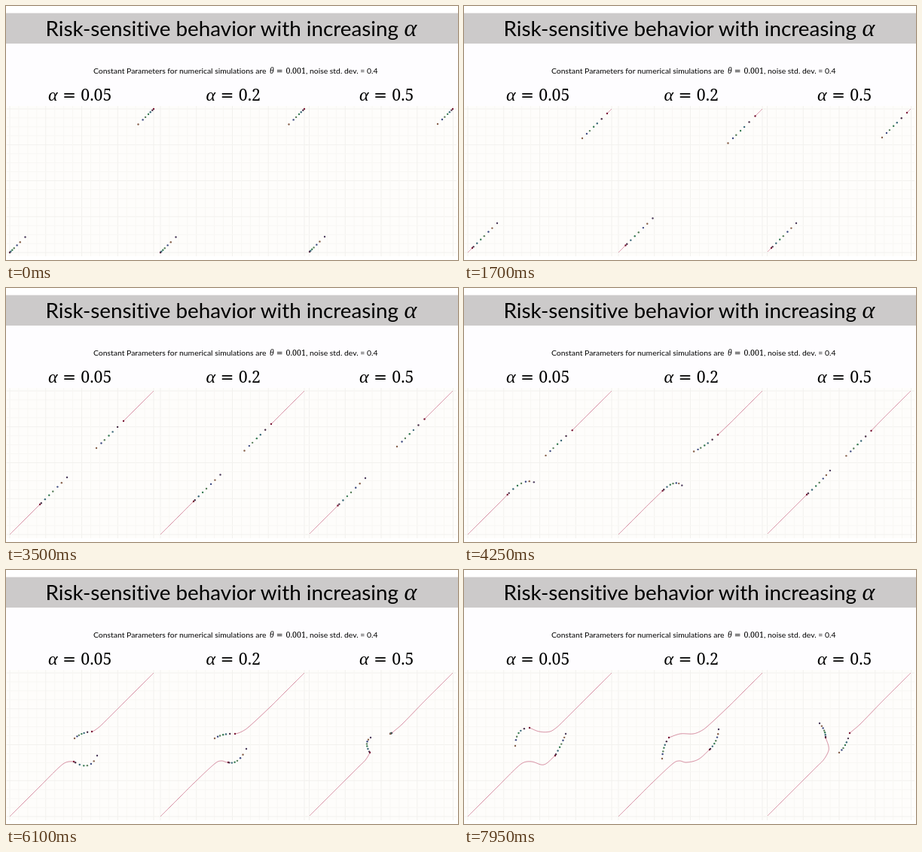
An HTML page for the animation above (8 s loop, 600 by 338 pixels).

```html
<!DOCTYPE html>
<html lang="en">
<head>
<meta charset="utf-8">
<title>Risk-sensitive behavior</title>
<style>
  html, body { margin: 0; width: 100%; height: 100%; overflow: hidden; background: #fff; }
  svg { display: block; width: 100vw; height: 100vh; }
  text { font-family: Lato, sans-serif; font-variant-ligatures: none; fill: #000; }
  .num { font-family: "Noto Serif", serif; }
  .sign { font-family: "DejaVu Serif", serif; }
  .var { font-family: "Liberation Serif", serif; font-style: italic; }
  .trail { fill: none; stroke: #c4607c; stroke-width: .75; }
</style>
</head>
<body>
<svg id="stage" viewBox="0 0 600 338">
  <rect y="50" width="600" height="83" fill="#fefdff"/>
  <rect y="9.5" width="600" height="40.5" fill="#cccaca"/>
  <rect y="133" width="600" height="200" fill="#fefdfb"/>
</svg>
<script>
const LOOP = 8000, STEP = 50, START = 700;
const stage = document.getElementById("stage");

function add(tag, attrs, content = "") {
  const el = document.createElementNS("http://www.w3.org/2000/svg", tag);
  for (const k in attrs) el.setAttribute(k, attrs[k]);
  el.textContent = content;
  stage.append(el);
  return el;
}
const label = (content, x, y, size, cls = "") => add("text", { x, y, "font-size": size, class: cls }, content);

// Text
label("Risk-sensitive behavior with increasing", 52.5, 40, 27.8);
label("α", 528.5, 40, 32, "var");
label("Constant Parameters for numerical simulations are", 116, 90, 10.42);
label("θ", 350, 90, 11.5, "var");
label("=", 358.8, 90, 10.5, "sign");
label("0.001", 371.5, 90, 10.6, "num");
label(", noise std. dev. = 0.4", 398, 90, 10.4);
for (const [x, value] of [[56, "0.05"], [265.5, "0.2"], [469, "0.5"]]) {
  label("α", x, 126, 24, "var");
  label("=", x + 19, 126, 21.5, "sign");
  label(value, x + 43.3, 126, 21.3, "num");
}

// Grid of the three plots
const UNIT = 11.94;
for (const cx of [100.5, 300.5, 498]) {
  for (let i = -8; i <= 8; i++) {
    const stroke = i % 4 ? "#f8f7f4" : "#f2f1ee", p = i * UNIT;
    add("path", { d: `M${cx + p} 133V333M${cx - 100} ${232.5 + p}h200`, stroke, "stroke-width": 1 });
  }
}

// Straight approach: distance of head and plan end from the start, per plot
const runs = [
  { head: [0, 6, 20, 40], end: [20.5, 39, 56, 76] },
  { head: [0, 9.5, 26, 44], end: [20.5, 45.5, 62.5, 79.5] },
  { head: [0, 5, 18, 37.5], end: [20, 38, 56, 74] }
];
// Avoidance: head points, then bend and end of the planned curve
const agents = [
  { run: 0, from: [5, 328], dir: 1,
    head: [[70, 263], [79.5, 256], [90, 255], [106, 259], [121, 247]],
    bend: [[93, 242], [111.5, 269], [131, 229.5]], end: [[104, 265], [121, 247], [135, 218]] },
  { run: 0, from: [196, 137], dir: -1,
    head: [[132, 201], [123, 209.5], [114, 215], [100, 215], [87, 210]],
    bend: [[113, 215.5], [100, 216], [69, 210]], end: [[99, 229], [91, 224], [68, 234]] },
  { run: 1, from: [205, 328], dir: 1,
    head: [[278, 257], [286, 254], [295, 256], [311, 252], [326, 239]],
    bend: [[292, 246], [308, 260], [337, 228]], end: [[295, 274], [319, 238], [338, 212]] },
  { run: 1, from: [396, 137], dir: -1,
    head: [[322, 209], [313, 215], [304, 218], [287, 218], [272, 223]],
    bend: [[306, 220], [288, 217], [264, 234]], end: [[294, 217], [277, 224], [263, 251]] },
  { run: 2, from: [403, 327], dir: 1,
    head: [[469, 261], [477, 253], [483, 243], [484, 235], [480, 223]],
    bend: [[485, 245], [474.5, 229], [480, 213]], end: [[491, 234], [484, 223], [472, 204]] },
  { run: 2, from: [593, 137], dir: -1,
    head: [[526, 205], [518, 212], [512, 217], [512, 217], [512, 217]],
    bend: [[513, 218], [511, 217], [508, 234]], end: [[500, 231], [510, 218], [498, 243]] }
];
const RUN_TIMES = [START, 1700, 2500, 3500];
const HEAD_TIMES = [...RUN_TIMES, 5000, 5550, 6100, 7000, 7950];
const PLAN_TIMES = [...RUN_TIMES, 5000, 6100, 7950];
const SPREAD = { 1: [0, .05, .19, .34, .48, .65, .8, 1], "-1": [0, .22, .4, .54, .7, .82, 1] };
const COLORS = ["#7a1836", "#4a3048", "#3a6878", "#357a52", "#5a805c", "#3d4a80", "#86604a", "#4c3c5c"];

// Smooth curve through points at given times
function follow(times, points, t) {
  t = Math.max(t, times[0]);
  const last = times.length - 1;
  let i = 0;
  while (i < last - 1 && t > times[i + 1]) i++;
  const span = times[i + 1] - times[i], u = (t - times[i]) / span;
  return [0, 1].map(k => {
    const slope = j => {
      const a = Math.max(j - 1, 0), b = Math.min(j + 1, last);
      return (points[b][k] - points[a][k]) / (times[b] - times[a]) * span;
    };
    const p = points[i][k], q = points[i + 1][k];
    return p + u * (slope(i) + u * (3 * (q - p) - 2 * slope(i) - slope(i + 1)
      + u * (2 * (p - q) + slope(i) + slope(i + 1))));
  });
}

for (const a of agents) {
  const run = runs[a.run];
  const along = d => [a.from[0] + a.dir * d, a.from[1] - a.dir * d];
  a.head = [...run.head.map(along), ...a.head];
  a.bend = [...run.end.map((e, i) => along(i ? (e + run.head[i]) / 2 : e * .1)), ...a.bend];
  a.end = [...run.end.map(along), ...a.end];
  a.trail = add("path", { class: "trail" });
  a.spread = SPREAD[a.dir];
  a.dots = a.spread.map((_, i) => add("circle", { r: 1.2, fill: COLORS[i] }));
}

function draw(t) {
  for (const a of agents) {
    const head = follow(HEAD_TIMES, a.head, t);
    const bend = follow(PLAN_TIMES, a.bend, t), end = follow(PLAN_TIMES, a.end, t);
    let d = "M" + a.from;
    for (let s = START; s < t; s += STEP) d += "L" + follow(HEAD_TIMES, a.head, s);
    a.trail.setAttribute("d", d + "L" + head);
    a.dots.forEach((dot, i) => {
      const u = a.spread[i], v = 1 - u;
      const at = k => v * v * head[k] + 2 * u * v * bend[k] + u * u * end[k];
      dot.setAttribute("cx", at(0));
      dot.setAttribute("cy", at(1));
    });
  }
}

function tick() {
  draw(Math.floor(performance.now() % LOOP / STEP) * STEP);
  requestAnimationFrame(tick);
}
tick();
</script>
</body>
</html>
```
